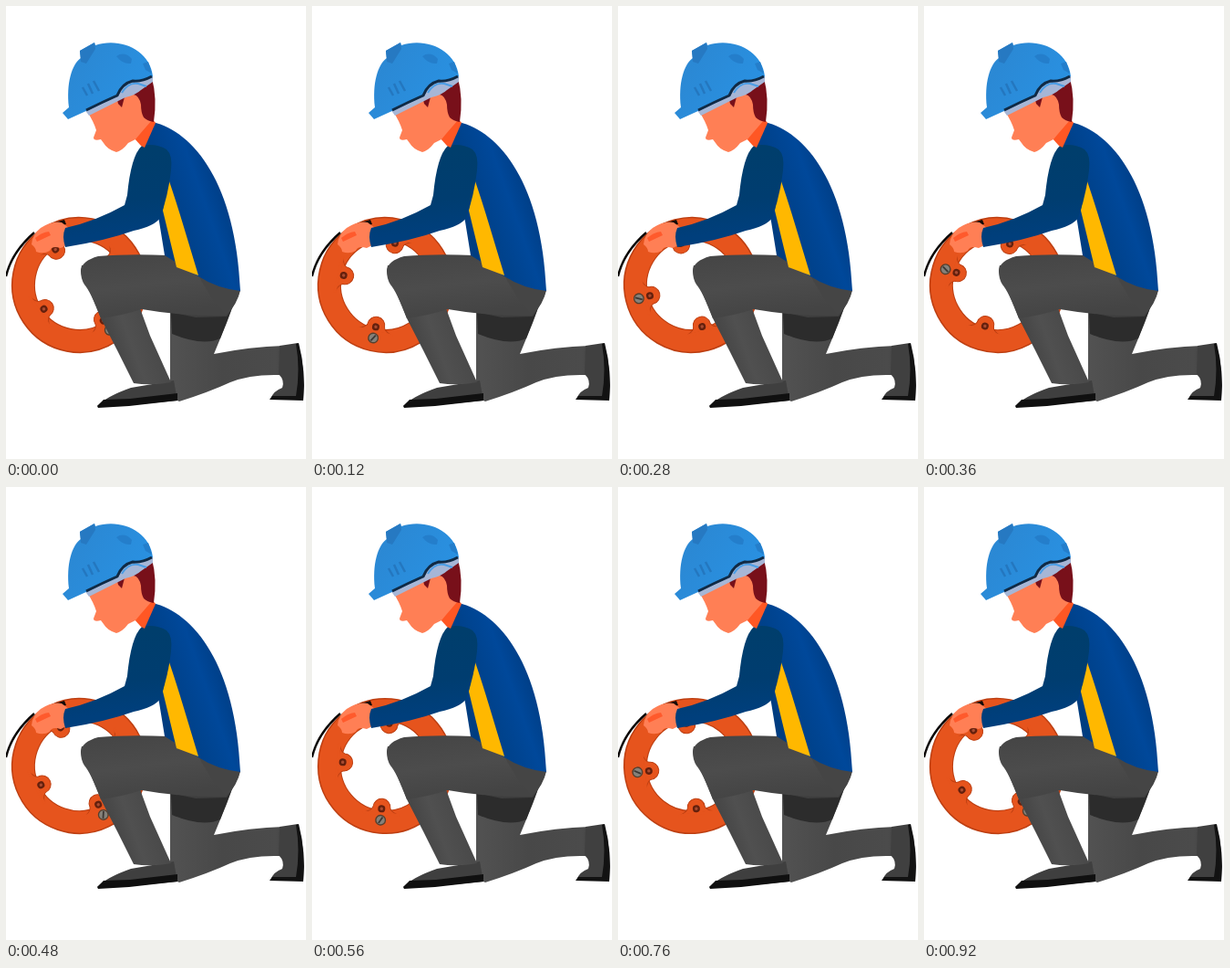
Recreate the animation shown at these times as an HTML page. Size 329x496 px, loop 0.96 s.

```html
<!DOCTYPE html>
<html lang="en">
<head>
<meta charset="utf-8">
<title>Worker turning a reel</title>
<style>
  html, body { margin: 0; width: 100%; height: 100%; overflow: hidden; background: #fff; }
  svg { display: block; width: 329px; height: 496px; }
</style>
</head>
<body>
<svg viewBox="0 0 329 496">
  <defs>
    <linearGradient id="torso" gradientUnits="userSpaceOnUse" x1="168" y1="235" x2="252" y2="205">
      <stop offset="0" stop-color="#003d80"/><stop offset=".6" stop-color="#00489a"/><stop offset="1" stop-color="#00397c"/>
    </linearGradient>
    <linearGradient id="sleeve" gradientUnits="userSpaceOnUse" x1="140" y1="160" x2="150" y2="245">
      <stop offset="0" stop-color="#003e6c"/><stop offset=".6" stop-color="#003d70"/><stop offset="1" stop-color="#003f7c"/>
    </linearGradient>
    <linearGradient id="thigh" gradientUnits="userSpaceOnUse" x1="150" y1="272" x2="158" y2="338">
      <stop offset="0" stop-color="#464646"/><stop offset=".5" stop-color="#4c4c4c"/><stop offset="1" stop-color="#444"/>
    </linearGradient>
    <linearGradient id="shin" gradientUnits="userSpaceOnUse" x1="104" y1="372" x2="164" y2="350">
      <stop offset="0" stop-color="#404040"/><stop offset=".5" stop-color="#505050"/><stop offset="1" stop-color="#484848"/>
    </linearGradient>
    <linearGradient id="back" gradientUnits="userSpaceOnUse" x1="180" y1="390" x2="325" y2="390">
      <stop offset="0" stop-color="#525252"/><stop offset=".4" stop-color="#484848"/><stop offset=".8" stop-color="#4b4b4b"/><stop offset="1" stop-color="#383838"/>
    </linearGradient>
    <linearGradient id="helmet" gradientUnits="userSpaceOnUse" x1="75" y1="50" x2="150" y2="100">
      <stop offset="0" stop-color="#2b87d2"/><stop offset="1" stop-color="#2991e2"/>
    </linearGradient>
    <g id="lobe">
      <path d="M52 -18Q49 -10 45.5 -9.5A9.5 9.5 0 0 0 45.5 9.5Q49 10 52 18Z" fill="#e6541d" stroke="#bd3f12"/>
      <path d="M54 -20V20H51V-20Z" fill="#e6541d"/>
      <circle cx="47" r="4" fill="#64200d"/>
      <circle cx="47" r="1.7" fill="#a84b31"/>
    </g>
    <g id="screw">
      <circle cx="59.5" r="6" fill="#55402f"/>
      <circle cx="59.5" r="4.6" fill="#85817a"/>
      <path d="M56 -2L63 2" stroke="#3c3835" stroke-width="1.8"/>
    </g>
  </defs>

  <g id="reel"></g>

  <path d="M0 296Q6 270 31 248" fill="none" stroke="#0b0705" stroke-width="2.4"/>
  <path d="M50 238L64 234L66 239L54 242Z" fill="#150b08"/>

  <!-- back leg -->
  <path d="M180 331L249 328L242 347L228 381Q268 373 304 372L300 404Q268 403 246 412Q222 423 190 433L180 428Z" fill="url(#back)"/>
  <path d="M300 372L320 369Q329 398 326 431L290 430Q294 421 303 418Q306 410 299 403Z" fill="#404040"/>
  <path d="M318 370L321 369Q329 400 326 432L289 431L292 427L318 427Q323 398 318 370Z" fill="#121212"/>
  <path d="M181 336L247 333L235 364Q216 373 182 359Z" fill="#2c2c2c"/>

  <!-- front leg -->
  <path d="M100 438Q111 427 137 418L184 410L188 432L135 437Z" fill="#3f3f3f"/>
  <path d="M100 438L107 431L136 430L188 424L188 432L135 438L101 440Z" fill="#101010"/>
  <path d="M83 284Q80 293 88 303L104 342L122 377L140 413Q160 416 181 412L158 361L147 331L132 290Z" fill="url(#shin)"/>
  <path d="M174 272L211 294L257 311Q252 327 242 340L208 341L180 335Z" fill="#3e3e3e"/>
  <path d="M82 290Q83 279 101 274Q135 271 177 273L212 295Q226 317 250 325L241 339Q195 340 149 332Q127 339 104 342Q93 313 86 305Q82 299 82 290Z" fill="url(#thigh)"/>
  <path d="M211 295L257 311Q254 326 241 339Q224 319 211 295Z" fill="#454545"/>

  <!-- body -->
  <path d="M161 127C206 138 252 194 257 312Q231 309 211 296L174 273L168 236L150 154Z" fill="url(#torso)"/>
  <path d="M178 189Q186 212 195 242L211 295L187 286L172 224Q175 206 178 189Z" fill="#ffb800"/>
  <path d="M28 261Q29 250 38 243Q51 235 61 237L69 243L66 262L60 265Q50 262 48 268Q41 272 33 269Q33 265 28 261Z" fill="#ff7f55"/>
  <path d="M32 254Q39 248 47 247L49 251L34 258Z" fill="#ff5a2c"/>
  <path d="M149 153Q137 164 133 207L130 218Q98 236 65 243Q61 252 65 264Q109 257 140 246Q163 241 169 232Q178 207 181 180Q183 163 176 157Q164 150 149 153Z" fill="url(#sleeve)"/>

  <!-- head -->
  <path d="M139 143L160 123L164 128L152 155L148 153Z" fill="#ff5724"/>
  <path d="M88 114L125 88L149 90L160 125L147 140L142 146L134 150Q128 158 121 160Q111 157 107 150L104 146Q96 148 96 144L99 136Q96 126 88 114Z" fill="#ff7f55"/>
  <path d="M121 99L131 96L127 111L123 107ZM140 90L160 79Q166 101 162 127Q155 126 151 122Q148 117 148 108Q146 98 140 97Z" fill="#78101a"/>
  <path d="M86 113L125 90L150 76L161 76L161 83L148 92Q143 97 131 100L91 120Z" fill="#a6b6d6"/>
  <path d="M69 111C66 85 72 64 82 57L81 49L97 40L98 43C125 34 158 48 161 77Q148 83 136 83Q127 88 122 99L90 114L68 124L62 117Z" fill="url(#helmet)"/>
  <path d="M81 49L97 40L98 47L88 63L82 61Z" fill="#2679c2"/>
  <path d="M121 55Q130 49 138 58L137 63Q128 64 121 55ZM150 63L156 61L160 74L153 70Z" fill="#247ecb"/>
  <path d="M84 89L89 98M90 85L95 96M96 82L102 93" stroke="#2477bf" stroke-width="2.5"/>
  <path d="M88 114Q106 105 122 98Q127 85 139 82Q149 83 160 77" fill="none" stroke="#102a45" stroke-width="3"/>
  <path d="M127 95Q134 83 145 85L154 88" fill="none" stroke="#4b9ee6" stroke-width="2"/>
</svg>
<script>
  const STEP = 40, FRAMES = 24, START = 56;
  const reel = document.getElementById('reel');
  const copies = (id, angles) =>
    angles.map(a => `<use href="#${id}" transform="rotate(${a})"/>`).join('');

  reel.innerHTML =
    '<circle r="61.5" fill="none" stroke="#bd3f12" stroke-width="26"/>' +
    '<circle r="61.3" fill="none" stroke="#e6541d" stroke-width="23.4"/>' +
    copies('lobe', [0, 90, 180, 270]) + copies('screw', [0, 180]);

  // A full turn takes 23 steps; the last pose repeats the first.
  function draw(now) {
    const step = Math.floor(now / STEP) % FRAMES;
    const angle = START + step * 360 / (FRAMES - 1);
    reel.setAttribute('transform', `translate(80.5 305.5) rotate(${angle})`);
  }

  const start = performance.now();
  function loop() {
    draw(performance.now() - start);
    requestAnimationFrame(loop);
  }
  loop();
</script>
</body>
</html>
```
